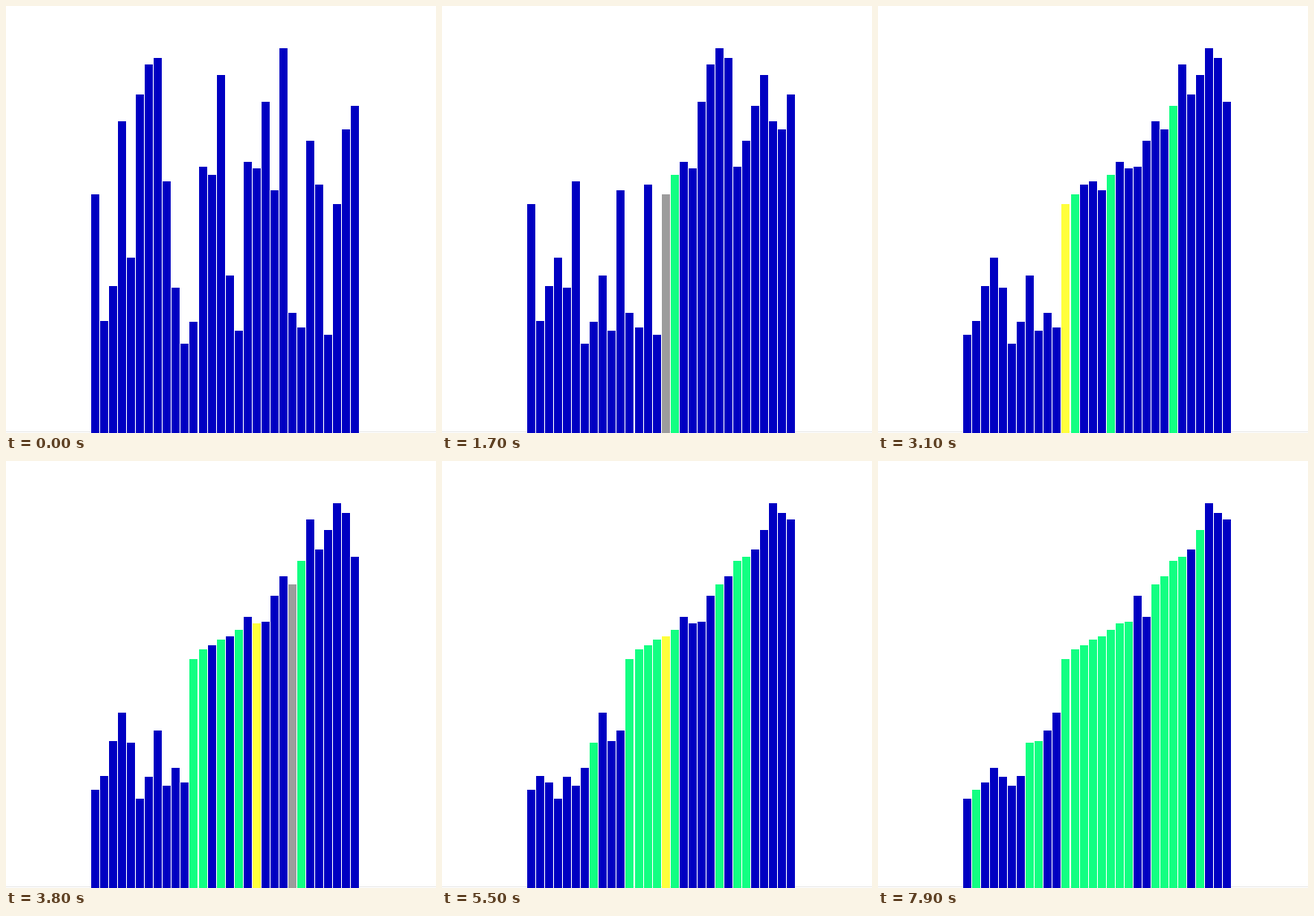
Write a matplotlib script that moves like this. It is 530 px wide and 526 px high and loops after 8 s.

```python
import matplotlib.pyplot as plt
import numpy as np
from matplotlib.animation import FuncAnimation
from matplotlib.patches import Rectangle

W, H, DPI = 530, 526, 100
STEP, LOOP = 100, 8000
BLUE, GREEN, YELLOW, GRAY = "#0000c2", "#12ff82", "#ffff3c", "#9c9c9c"

# Top edge of each bar, in pixels from the top of the stage
TOPS = [232, 388, 345, 142, 310, 109, 72, 64, 216, 347,
        416, 389, 198, 208, 85, 332, 400, 192, 200, 118,
        227, 52, 378, 396, 166, 220, 405, 244, 152, 123]
# Randomly picked pivot positions, one per partition
PIVOTS = [13, 0, 25, 0, 13, 22, 29, 4, 13, 15, 19, 22, 26, 0, 9, 17]

# Pauses in ms
START, PICK, COMPARE, SWAP, SETTLE, REST = 406, 100, 21, 30, 105, 90


def record_sort():
    """Breadth-first quicksort; returns snapshot times and snapshots."""
    tops, done = TOPS[:], set()
    times, shots = [], []
    now = 0

    def snap(wait, pivot=None, store=None):
        nonlocal now
        colors = [GREEN if i in done else BLUE for i in range(len(tops))]
        if pivot is not None:
            colors[pivot] = GRAY
        if store is not None:
            colors[store] = YELLOW
        times.append(now)
        shots.append((tops[:], colors))
        now += wait

    def swap(a, b):
        tops[a], tops[b] = tops[b], tops[a]

    snap(START)
    ranges = [(0, len(tops) - 1)]
    for pick in PIVOTS:
        lo, hi = ranges.pop(0)
        swap(pick, hi)
        snap(PICK, hi)
        store = lo
        snap(COMPARE, hi, store)
        for j in range(lo, hi):
            moved = False
            if tops[j] > tops[hi]:
                moved = j != store
                swap(j, store)
                store += 1
            # The marker blinks off while two bars trade places
            if moved:
                snap(SWAP, hi)
            else:
                snap(COMPARE, hi, store)
        snap(SETTLE, hi, store)
        swap(store, hi)
        done.add(store)
        snap(REST)
        for part in ((lo, store - 1), (store + 1, hi)):
            if part[0] <= part[1]:
                ranges.append(part)
    return times, shots


times, shots = record_sort()

fig = plt.figure(figsize=(W / DPI, H / DPI), dpi=DPI, facecolor="white")
ax = fig.add_axes([0, 0, 1, 1])
ax.set_xlim(0, W)
ax.set_ylim(H, 0)
ax.axis("off")

ax.add_patch(Rectangle((0, H - 2), W, 1, color="#e8e8e8", lw=0,
                       antialiased=False))
bars = [ax.add_patch(Rectangle((round(105 + 11.043 * i), top), 10, H - top,
                               facecolor=BLUE, lw=0, antialiased=False))
        for i, top in enumerate(TOPS)]


def draw(frame):
    tops, colors = shots[np.searchsorted(times, frame * STEP, "right") - 1]
    for bar, top, color in zip(bars, tops, colors):
        bar.set_y(top)
        bar.set_height(H - top)
        bar.set_facecolor(color)
    return bars


anim = FuncAnimation(fig, draw, frames=LOOP // STEP, interval=STEP,
                     repeat=True, repeat_delay=0, blit=False)
plt.show()
```
